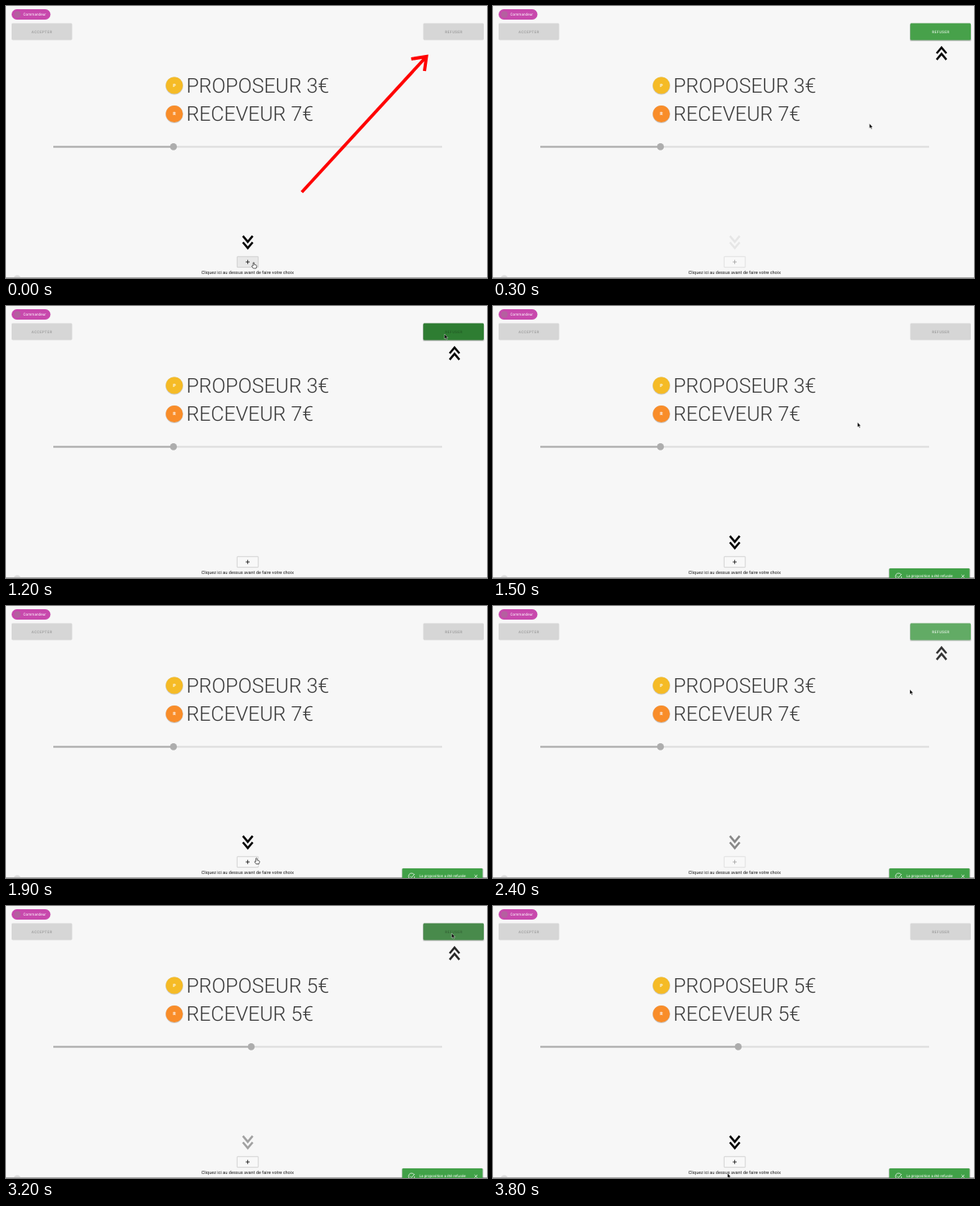
These frames come from a looping animation (600x339 px, 3900 ms). An HTML page:

```html
<!DOCTYPE html>
<html lang="fr">
<head>
<meta charset="utf-8">
<title>Accepter ou refuser</title>
<style>
html, body { margin: 0; height: 100%; overflow: hidden; background: #f7f7f7; }
svg { display: block; width: 100%; height: 100%; font-family: Roboto, sans-serif; text-rendering: geometricPrecision; }
.mid { text-anchor: middle; }
.btn { font-size: 4.7px; font-weight: 500; letter-spacing: .36px; fill: #000; fill-opacity: .26; }
.big { font-size: 25.35px; font-weight: 300; fill: #383838; }
.small { font-size: 4.7px; fill: #fff; }
.badge { font-size: 5.5px; font-weight: 700; fill: #fff; }
</style>
</head>
<body>
<svg viewBox="0 0 600 339">
  <defs>
    <path id="chevrons" d="M-6.1-8.3L0-1.1L6.1-8.3M-6.1-.5L0 6.7L6.1-.5" fill="none" stroke="#000" stroke-width="2.6"/>
  </defs>

  <rect x="7" y="4" width="48.5" height="13" rx="6.5" fill="#c849ad"/>
  <circle cx="14.3" cy="10.5" r="4" fill="#b4609f"/>
  <text x="21.5" y="12.2" class="small">Commandeur</text>

  <rect x="7" y="21.5" width="75.5" height="21" rx="1.4" fill="#d6d6d6"/>
  <text x="44.8" y="33.7" class="btn mid">ACCEPTER</text>

  <rect x="520.5" y="21.5" width="75.5" height="21" rx="1.4" fill="#d6d6d6"/>
  <g id="active">
    <rect x="520" y="22.5" width="76.5" height="21.3" rx="1.6" opacity=".22"/>
    <rect id="green" x="520.5" y="21.5" width="75.5" height="21" rx="1.4"/>
  </g>
  <text id="refuse" x="558.5" y="33.7" class="btn mid">REFUSER</text>

  <circle cx="210" cy="99.5" r="10.9" opacity=".18"/>
  <circle cx="210" cy="99" r="10.6" fill="#f5bb26"/>
  <text x="210" y="100.9" class="badge mid">P</text>
  <text id="giver" x="225" y="107.7" class="big"></text>
  <circle cx="210" cy="135" r="10.9" opacity=".18"/>
  <circle cx="210" cy="134.5" r="10.6" fill="#f98d29"/>
  <text x="210" y="136.4" class="badge mid">R</text>
  <text id="taker" x="225" y="143.4" class="big"></text>

  <rect x="59" y="174.5" width="485" height="2" fill="#dcdcdc"/>
  <rect id="filled" x="59" y="174.5" height="2" fill="#ababab"/>
  <circle id="thumb" cy="175.4" r="4.3" fill="#adadad"/>

  <use id="up" href="#chevrons" transform="translate(559.5 58.5) scale(1 -1)"/>
  <use id="down" href="#chevrons" transform="translate(301.6 295)"/>

  <rect id="plusBox" x="288.3" y="312.3" width="26.4" height="13.4" rx=".6" stroke-width=".7"/>
  <path id="plus" d="M299 319h5M301.5 316.5v5" stroke-width=".9"/>
  <text x="301.3" y="333.9" class="mid" font-size="5.57" fill="#1c1c1c">Cliquez ici au dessus avant de faire votre choix</text>

  <circle cx="14" cy="340" r="4.5" fill="#dedede"/>
  <rect y="338" width="600" height="1" fill="#a8a8a8"/>

  <g id="toast">
    <rect x="493.6" y="326.8" width="101.8" height="16" rx="1.8" opacity=".2"/>
    <rect x="494.3" y="327" width="100.2" height="16" rx="1.4" fill="#41a148"/>
    <path d="M509 334.6A3.8 3.8 0 1 0 509.7 337M504 336.6l1.8 1.8l4-4.2M584.4 335l3.6 3.6M588 335l-3.6 3.6" fill="none" stroke="#fff" stroke-width=".7"/>
    <text x="515.5" y="338.2" class="small">La proposition a été refusée</text>
  </g>

  <path id="redArrow" d="M369 232L524 63.5M505.5 66L524.5 63L522 81" fill="none" stroke="#f00" stroke-width="4"/>

  <g id="cursor">
    <path id="pointer" d="M0 0V6L1.4 4.8L2.4 7L3.4 6.5L2.4 4.5H4.2Z" fill="#000" stroke="#fff" stroke-width=".4"/>
    <path id="hand" d="M-.8 0Q0-.8.7 0V2.3L3.2 3Q4 3.3 3.8 4.4L3 7H-.6L-2.5 4.2Q-2.2 3.2-.8 4Z" fill="#fff" stroke="#222" stroke-width=".7"/>
  </g>
</svg>
<script>
const LOOP = 3900, FADE = 300;
const onPlus = [309, 320], onRefuse = [556, 34];

// The refuse button is switched on, off, on, ... at these times
const switches = [20, 1200, 2235, 2495, 2795, 3095];

// Where the cursor turns or rests: time, position
const stops = [
  [0, onPlus], [300, [469.5, 146.5]], [900, [547, 35]], [1200, [547, 35]],
  [1900, [312.5, 314.5]], [2200, onPlus], [2400, [520, 104]], [2500, onRefuse],
  [2800, onPlus], [3200, onRefuse], [3800, [292.5, 333]]
];

const $ = id => document.getElementById(id);
const set = (id, attrs) => {
  for (const key in attrs) $(id).setAttribute(key, attrs[key]);
};
const clamp = v => Math.min(1, Math.max(0, v));
const ease = p => p * p * (3 - 2 * p);

function cursorAt(t) {
  const i = stops.findLastIndex(([time]) => time <= t);
  const [t0, from] = stops[i];
  const [t1, to] = stops[i + 1] || [LOOP, from];
  const p = ease((t - t0) / (t1 - t0));
  return from.map((v, k) => v + (to[k] - v) * p);
}

// 0 while the plus button is offered, 1 while refusing is possible
const refusing = t => clamp(switches.reduce(
  (sum, s, i) => sum + (i % 2 ? -1 : 1) * clamp((t - s) / FADE), 0));

function draw(now) {
  const time = now % LOOP;
  const step = time < 900 ? 300 : 100;
  const t = Math.floor(time / step) * step;
  const [x, y] = cursorAt(t);
  const level = refusing(t);
  const up = level ** .4;
  const waiting = switches.filter(s => s <= t).length % 2 === 0;
  const overRefuse = x > 520 && y > 21 && y < 43;
  const overPlus = x > 288 && x < 315 && y > 312 && y < 326;
  const intro = t < 300;
  const offer = t < 2700 ? 3 : 5;
  const thumbX = 63.4 + 48.5 * offer;

  set('up', { opacity: up });
  set('down', { opacity: 1 - level });
  set('active', { opacity: up });
  set('green', { fill: overRefuse ? '#2e7d32' : '#43a047' });
  $('refuse').style.fill = waiting ? '#000' : '#fff';
  $('refuse').style.fillOpacity = waiting ? .26 : .78;

  $('giver').textContent = `PROPOSEUR ${offer}€`;
  $('taker').textContent = `RECEVEUR ${10 - offer}€`;
  set('filled', { width: thumbX - 59 });
  set('thumb', { cx: thumbX });

  set('plusBox', { fill: intro ? '#e8e8e8' : '#f8f8f8', stroke: waiting ? '#c4c4c4' : '#d8d8d8' });
  set('plus', { stroke: waiting ? '#222' : '#a6a6a6' });
  set('toast', { opacity: t < 1400 ? 0 : 1 });
  set('redArrow', { opacity: intro ? 1 : 0 });

  set('cursor', { transform: `translate(${x} ${y})` });
  set('pointer', { opacity: overPlus ? 0 : 1 });
  set('hand', { opacity: overPlus ? 1 : 0 });
}

const start = performance.now();
function tick() {
  draw(performance.now() - start);
  requestAnimationFrame(tick);
}
tick();
</script>
</body>
</html>
```
